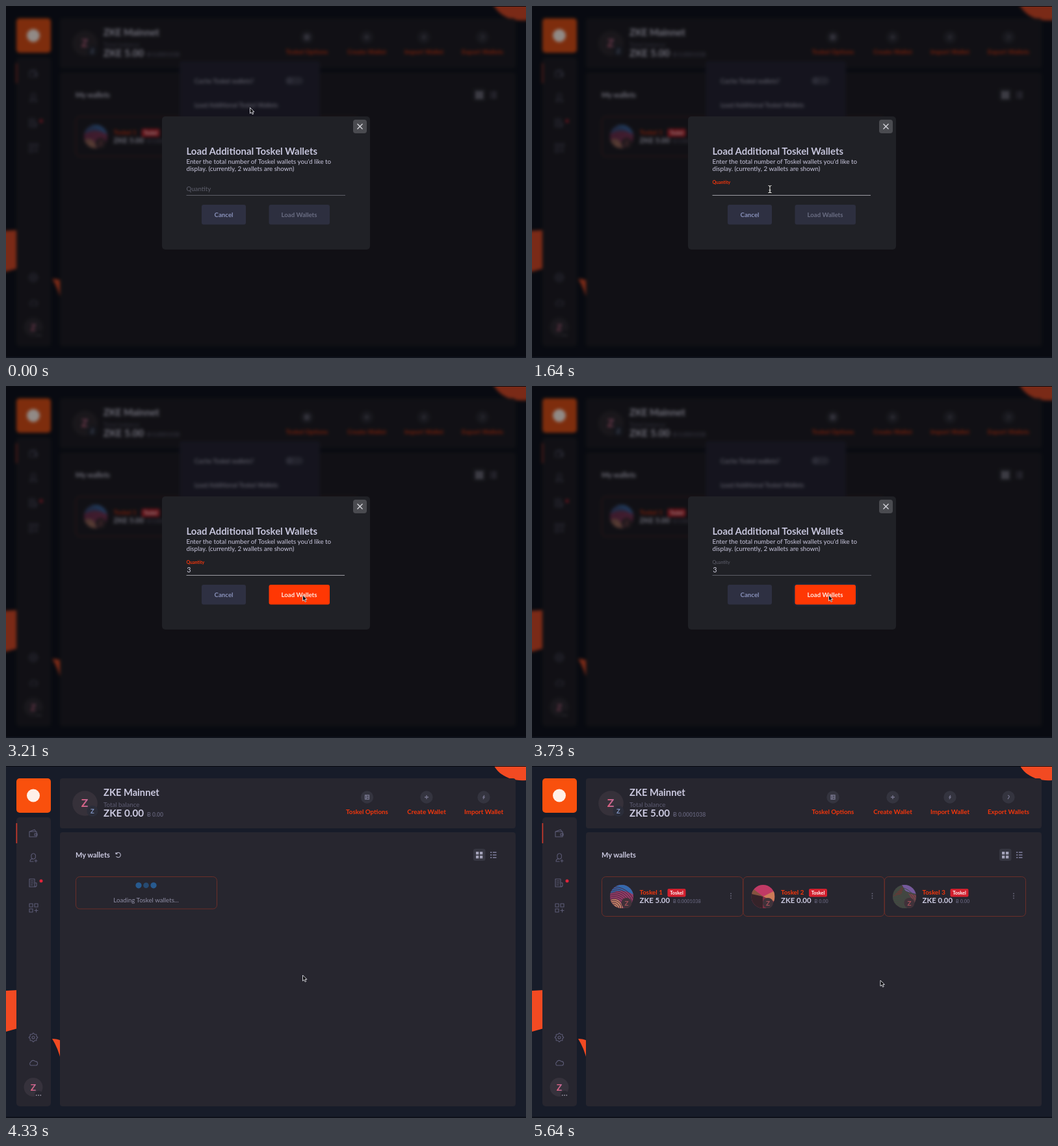
An HTML page for the animation above (5.67 s loop, 800x542 px).

```html
<!DOCTYPE html>
<html lang="en">
<head>
<meta charset="utf-8">
<title>Load wallets</title>
<style>
html, body { margin: 0; width: 100%; height: 100%; overflow: hidden; background: #0a0b10; }
svg { display: block; width: 800px; height: 542px; overflow: hidden; font-family: Lato, "Open Sans", sans-serif; }
.dim { filter: blur(2.8px) brightness(.57) contrast(1.05) saturate(.8); }
.b { font-weight: 700; }
.line { fill: none; stroke: #5c5b76; stroke-width: 1.1; stroke-linecap: round; stroke-linejoin: round; }
</style>
</head>
<body>
<svg id="stage" viewBox="0 0 800 542"></svg>
<script>
const LOOP = 5670, FOCUS = 660, TYPE = 2600, CLICK = 3240, CLOSE = 3760, LOADED = 4430;
const BRAND = "Toskel", COIN = "ZKE", PANEL = "#27262f", LIGHT = "#cbc9e0", MUTED = "#5d5c72", RED = "#f4360c";

const rect = (x, y, w, h, fill, r = 0, extra = "") =>
  `<rect x="${x}" y="${y}" width="${w}" height="${h}" rx="${r}" fill="${fill}" ${extra}/>`;
const dot = (x, y, r, fill, extra = "") => `<circle cx="${x}" cy="${y}" r="${r}" fill="${fill}" ${extra}/>`;
const path = (d, fill, extra = "") => `<path d="${d}" fill="${fill}" ${extra}/>`;
const line = d => `<path class="line" d="${d}"/>`;
const text = (x, y, size, fill, s, bold = true, extra = "") =>
  `<text x="${x}" y="${y}" font-size="${size}" fill="${fill}" ${bold ? 'class="b"' : ""} ${extra}>${s}</text>`;
const mid = (x, y, size, fill, s, bold = true, extra = "") =>
  text(x, y, size, fill, s, bold, 'text-anchor="middle" ' + extra);
const group = (id, body) => `<g id="${id}">${body}</g>`;
const at = (x, y, body) => `<g transform="translate(${x} ${y})">${body}</g>`;

function sidebar() {
  const gear = Array.from({ length: 17 }, (_, i) => {
    const a = i * Math.PI / 8, r = i % 2 ? 5.2 : 6.8;
    return (i ? "L" : "M") + (r * Math.cos(a)).toFixed(1) + " " + (r * Math.sin(a)).toFixed(1);
  }).join("");
  return rect(16, 79, 53, 445, PANEL, 5) + rect(16, 19, 53, 53, "#f9500d", 5) + dot(42, 45.5, 10, "#fff0e8") +
    rect(15.5, 88, 1.7, 31, "#c93a2c") +
    at(42, 104, line("M-6 -3H5V5H-6ZM-6 -3L2 -6L4 -3M6 0H2V3H6Z")) +
    at(42, 142, line("M-3 -3A3.3 3.3 0 1 1 3.3 -3A3.3 3.3 0 1 1 -3 -3M-5 5Q-5 1 -1 1M-5 5H0M4 2V6M2 4H6")) +
    at(41, 180, line("M-5 -6H3V6H-5ZM3 0H6V4Q6 6 3 6M-3 -3H1M-3 0H1M-3 3H0")) + dot(54, 177, 2.5, "#e0243a") +
    at(42, 218, line("M-6 -6H-1V-1H-6ZM2 -6H7V-1H2ZM-6 2H-1V7H-6ZM4.5 2V7M2 4.5H7")) +
    at(42, 418, line(gear) + line("M-2 0A2 2 0 1 1 2 0A2 2 0 1 1 -2 0")) +
    at(42, 457, line("M-4 4A3 3 0 0 1 -4 -1A4 4 0 0 1 3 -2A3 3 0 0 1 4 4Z")) +
    dot(42, 494.5, 14.5, "#36323c") + mid(42, 499.5, 14, "url(#pink)", COIN[0]) +
    dot(50, 506, 6, PANEL) + [46.7, 50, 53.3].map(x => dot(x, 507, .8, "#c8c6d8")).join("");
}

function action(x, label, icon) {
  return dot(x, 48, 9.7, "#34343f") + at(x, 48, `<path d="${icon}" fill="none" stroke="#77768f" stroke-width="1.3"/>`) +
    mid(x, 74, 9.8, RED, label);
}
const icons = ["M-3 -3H3V3H-3ZM-1 -3V3M-1 0H3", "M-3 0H3M0 -3V3", "M1 -3L-1 0H1L-1 3", "M-1 -3Q2 -2 1 0L-1 3"];
const actions = (xs, labels) => xs.map((x, i) => action(x, labels[i], icons[i])).join("");
const labels = [BRAND + " Options", "Create Wallet", "Import Wallet", "Export Wallets"];

function avatar(i) {
  const stripes = (n, step, color) => Array.from({ length: n }, (_, k) =>
    `<circle r="${6 + k * step}" cx="-12" cy="18" fill="none" stroke="${color}"/>`).join("");
  const art = [
    rect(-18, -18, 36, 36, "#963c68") + path("M-18 -18H18V-3Q0 -14 -18 -4Z", "#3469ad") +
      path("M-18 6Q-4 -2 2 18H-18Z", "#c38466") + stripes(10, 3, "#45263b"),
    rect(-18, -18, 36, 36, "#c03a65") + path("M0 0L-18 -7V18H0Z", "#352329") + path("M0 0L18 -9V8Z", "#cc7b58") +
      path("M0 0L18 8V18H0Z", "#7b2f42") + path("M0 0L-18 -14V-4Z", "#84533f"),
    rect(-18, -18, 36, 36, "#454342") + path("M-4 -18H18V-4L2 -8Z", "#75599c") + path("M6 -5L18 -2V14Z", "#823c4c") +
      path("M-18 0L-2 -16L-4 -4Z", "#6b3436") + stripes(10, 3, "#3b5140")
  ][i];
  return `<g clip-path="url(#round)">${art}</g>` + dot(7.5, 10, 8, "#40323a") + mid(7.5, 13.7, 10, "#a65058", COIN[0]);
}

function card(i) {
  const main = i ? "0.00" : "5.00", sub = i ? "0.00" : "0.0001038";
  return `<g id="card${i}" transform="translate(${107 + i * 217.5} 170)">` +
    rect(.5, .5, 217, 61, "none", 6, 'stroke="#6a2e29"') + at(31, 31, avatar(i)) +
    text(58.5, 28.3, 9.8, RED, `${BRAND} ${i + 1}`) + rect(101.5, 19, 28, 12.5, "#d3212f", 2) +
    mid(115.5, 27.9, 7.4, "#fff", BRAND) + text(58.5, 41, 11.4, LIGHT, `${COIN} ${main}`) +
    text(110, 41, 7.4, MUTED, "Ƀ " + sub) + [26.5, 30, 33.5].map(y => dot(199, y, .9, "#6b6a7c")).join("") + "</g>";
}

function app() {
  return rect(-20, -20, 840, 582, "#171c29") +
    path("M751 0C760 16 780 24 800 22L820 20V-20H740Z", "#f24a22") +
    path("M-20 348L0 346L18 345V404L0 409L-20 412Z", "#f24a22") +
    path("M71 420Q79 420 85 423V455Q80 434 71 420Z", "#f24a22") + sidebar() +
    rect(83, 19, 701, 77, PANEL, 4) + rect(83, 102, 701, 422, PANEL, 4) +
    dot(121.5, 57.5, 19.3, "#36313a") + mid(121, 63.3, 17.5, "url(#pink)", COIN[0]) +
    dot(133, 69.5, 8.5, "#2b2d39") + mid(133, 73, 9.5, "#8296c4", COIN[0]) +
    text(150, 46.3, 14.7, LIGHT, COIN + " Mainnet") + text(150, 63, 9.7, MUTED, "Total balance", false) +
    text(150, 78.3, 15.2, LIGHT, "", true, 'id="total"') + text(217, 78, 8.7, MUTED, "", true, 'id="btc"') +
    group("four", actions([463, 555, 643, 733], labels)) + group("three", actions([555.5, 647, 735], labels)) +
    text(107, 140.5, 11, LIGHT, "My wallets") +
    rect(719, 127.5, 18.5, 18.5, "#363641", 3) +
    [[723, 132], [729, 132], [723, 138], [729, 138]].map(p => rect(...p, 4.3, 4.3, "#a3a2b8")).join("") +
    [132, 136, 140].map(y => rect(745, y, 2.5, 2, "#6b6a84") + rect(749, y, 5.5, 2, "#6b6a84")).join("") +
    [0, 1, 2].map(card).join("") +
    group("loading",
      at(172.5, 137, `<path d="M-3 -2A3.7 3.7 0 1 1 -3 2M-3.5 -4V-1.5H-1" fill="none" stroke="#b9b8cc" stroke-width="1.1"/>`) +
      rect(107.5, 170.5, 217, 49.5, "none", 6, 'stroke="#6a2e29"') +
      [204, 215.5, 227].map(x => at(x, 183.8, dot(0, 0, 5.1, "#2770b8", 'class="beat"'))).join("") +
      mid(215.5, 210, 9.7, "#8f8ea5", `Loading ${BRAND} wallets...`, false)) +
    group("menu", rect(267, 85, 216, 120, "#2d2c40", 4) +
      text(290, 118.5, 9.7, LIGHT, `Cache ${BRAND} wallets?`, false) + rect(430, 109, 27, 12, "#45455a", 6) +
      dot(436, 115, 5, "#55556c") + text(290, 156, 9.7, LIGHT, `Load Additional ${BRAND} Wallets`, false));
}

function dialog() {
  return rect(240, 170, 320, 205, "#202126", 5) + rect(534, 175, 21, 21, "#4a4b50", 4) +
    `<path d="M540.5 181.5l8 8m0 -8l-8 8" stroke="#dcdce2" stroke-width="1.2"/>` +
    text(277.5, 228.7, 14.9, "#c5c4db", `Load Additional ${BRAND} Wallets`) +
    text(277.5, 243, 9.75, LIGHT, `Enter the total number of ${BRAND} wallets you'd like to`, false) +
    text(277.5, 254, 9.75, LIGHT, "display. (currently, 2 wallets are shown)", false) +
    text(277.5, 285, 9.7, "#5a5b68", "Quantity", false, 'id="label"') +
    text(278.3, 287, 10.8, "#d2d1df", "3", false, 'id="value"') +
    rect(283.6, 277.5, 1, 12, "#d8d8e4", 0, 'id="caret"') + rect(277.5, 291, 244, 1, "#5c5d66", 0, 'id="rule"') +
    rect(301, 306, 68, 30.5, "#2e3042", 3) + mid(335, 324.7, 9.7, "#8a92bb", "Cancel") +
    rect(404.5, 306, 93.5, 30.5, "#2d2f3f", 3, 'id="button"') +
    mid(451, 324.7, 9.6, "#6b6e84", "Load Wallets", true, 'id="action"');
}

const stage = document.getElementById("stage");
stage.innerHTML = `<defs><clipPath id="round"><circle r="18"/></clipPath>
  <linearGradient id="pink"><stop stop-color="#e55f7d"/><stop offset="1" stop-color="#b96c9c"/></linearGradient></defs>` +
  group("app", app()) + rect(0, 0, 800, 1, "#090b11") + rect(0, 540, 800, 2, "#0e111a") + group("dialog", dialog()) +
  group("pointer",
    group("arrow", path("M0 0V9L2.1 7.1L3.6 10.3L5.2 9.6L3.7 6.5H6.4Z", "#08080a", 'stroke="#e4e4ea" stroke-width=".9"')) +
    group("beam", [["#111", 2.6], ["#eee", 1.1]].map(([color, width]) =>
      path("M-2.5 -5.5Q0 -5.5 0 -3.5Q0 -5.5 2.5 -5.5M0 -3.5V3.5M-2.5 5.5Q0 5.5 0 3.5Q0 5.5 2.5 5.5M-1.5 1.5H1.5",
        "none", `stroke="${color}" stroke-width="${width}"`)).join("")));

const $ = id => document.getElementById(id);
const show = (id, on) => $(id).style.display = on ? "" : "none";
const set = (id, attrs) => { for (const k in attrs) $(id).setAttribute(k, attrs[k]); };
const beats = [...document.querySelectorAll(".beat")];

// Pointer moves: start, end, x, y
const moves = [[150, 590, 367, 281], [850, 1300, 366, 282], [2150, 2650, 389, 288], [2950, 3200, 456.5, 322], [4460, 4990, 536, 330]];
function pointerAt(t) {
  let x = 375.5, y = 156.5;
  for (const [start, end, toX, toY] of moves) {
    const p = Math.min(1, Math.max(0, (t - start) / (end - start))), e = p * p * (3 - 2 * p);
    x += (toX - x) * e;
    y += (toY - y) * e;
  }
  return [x, y];
}

function render(t) {
  const open = t < CLOSE, loading = !open && t < LOADED, loaded = t >= LOADED;
  const focused = t >= FOCUS && t < CLICK, typed = t >= TYPE;
  const [x, y] = pointerAt(t);
  const inField = open && x > 277 && x < 522 && y > 274 && y < 293;
  const hover = open && x > 404 && x < 498 && y > 306 && y < 337;

  $("app").setAttribute("class", open ? "dim" : "");
  show("dialog", open);
  show("menu", open);
  show("loading", loading);
  show("three", loading);
  show("four", !loading);
  for (let i = 0; i < 3; i++) show("card" + i, loaded || open && i < 2);
  $("total").textContent = `${COIN} ${loading ? "0.00" : "5.00"}`;
  $("btc").textContent = "Ƀ " + (loading ? "0.00" : "0.0001038");

  const small = t >= FOCUS;
  set("label", { y: small ? 273.7 : 285, "font-size": small ? 7 : 9.7,
    fill: focused ? RED : "#5f606d", "font-weight": focused ? 700 : 400 });
  set("rule", { fill: focused ? "#9c9ca3" : "#5c5d66", width: focused ? 243.5 : 244.5 });
  show("value", typed);
  show("caret", focused && (t - (typed ? TYPE : FOCUS)) % 1000 < 500);
  set("caret", { x: typed ? 283.8 : 278 });
  set("button", { fill: hover ? "#ff3703" : typed ? "#2e3042" : "#2d2f3f" });
  $("button").style.filter = hover && t >= CLICK ? "drop-shadow(0 0 2px #17375f)" : "";
  set("action", { fill: hover ? "#ffece6" : typed ? "#8a92bf" : "#6b6e84" });

  beats.forEach((el, i) => {
    const s = Math.max(0, t - CLOSE - (i % 2) * 350) % 700 / 350, dip = s < 1 ? s : 2 - s;
    el.setAttribute("transform", `scale(${1 - .25 * dip})`);
    el.setAttribute("opacity", 1 - .8 * dip);
  });

  set("pointer", { transform: `translate(${x} ${y})` });
  show("beam", inField);
  show("arrow", !inField);
}

const begin = performance.now();
function tick() {
  render((performance.now() - begin) % LOOP);
  requestAnimationFrame(tick);
}
tick();
</script>
</body>
</html>
```
